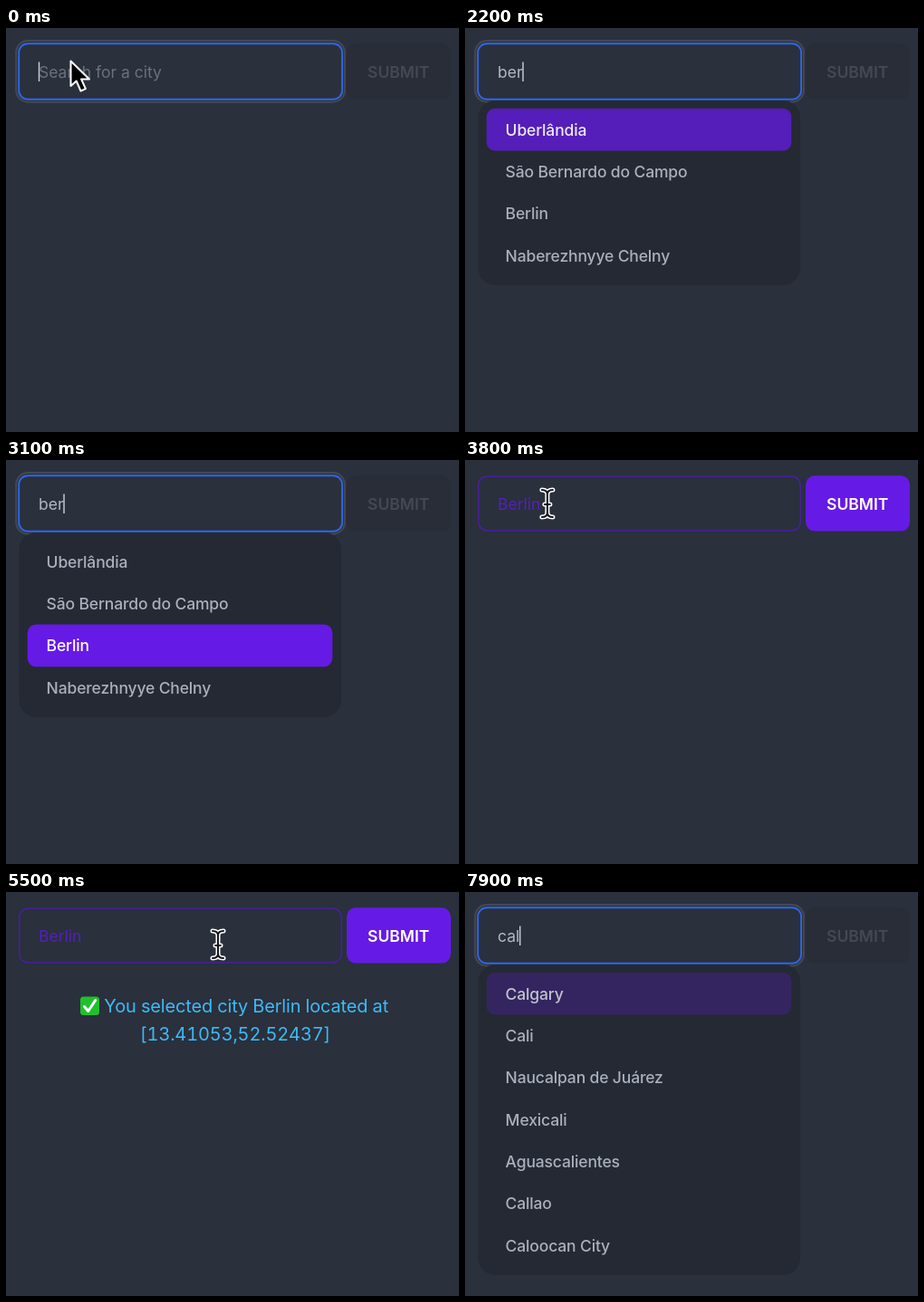
Recreate the animation shown at these times as an HTML page. Size 500 px wide and 446 px high, loop 8 s.

```html
<!DOCTYPE html>
<html lang="en">
<head>
<meta charset="utf-8">
<title>City search</title>
<style>
  html, body { margin: 0; width: 100%; height: 100%; overflow: hidden; background: #2a303c; }
  svg { display: block; width: 100%; height: 100%; }
  text { font: 400 17.5px Inter, "Open Sans", sans-serif; white-space: pre; }
  #label { font-weight: 600; text-anchor: middle; }
  #menus text { font-weight: 500; letter-spacing: -.15px; }
  #message text { font-size: 20px; letter-spacing: -.16px; font-variant-numeric: tabular-nums; fill: #3fbaf6; }
</style>
</head>
<body>
<svg viewBox="0 0 500 446">
  <rect width="500" height="446" fill="#2a303c"/>

  <g id="button">
    <rect id="face" x="376" y="17.2" width="115" height="61.4" rx="10"/>
    <text id="label" x="433.2" y="54.5">SUBMIT</text>
  </g>

  <rect id="idle" x="14.8" y="18.1" width="355.4" height="59.8" rx="9.5" fill="none" stroke="#4b1e9f" stroke-width="1.5"/>
  <g id="focus" fill="none">
    <rect x="11.2" y="14.1" width="362.7" height="67.6" rx="13" stroke="#434954" stroke-width="2"/>
    <rect x="14.2" y="17.2" width="356.9" height="61.6" rx="10" stroke="#2e66e6" stroke-width="1.9"/>
  </g>
  <text id="value" x="36" y="54.5"></text>
  <rect id="caret" y="37.5" width="1.4" height="21.5" fill="#cdd1d9"/>

  <g id="menus"></g>

  <g id="message">
    <rect x="82" y="115.5" width="21" height="20.5" rx="3.5" fill="#20c02c"/>
    <path d="M86.5 126.5l4.2 5 8-12" fill="none" stroke="#fff" stroke-width="3" stroke-linecap="round" stroke-linejoin="round"/>
    <text x="108.3" y="133">You selected city Berlin located at</text>
    <text x="253" y="164" text-anchor="middle">[13.41053,52.52437]</text>
  </g>

  <!-- pointers, hot spot at the origin -->
  <g id="arrow" stroke-linejoin="round">
    <path d="M0 0V27.5L6.2 22 11 33 16.4 30.7 11.6 20H20.5Z" fill="#000" stroke="#fff" stroke-width="2"/>
  </g>
  <defs>
    <path id="beamLine" d="M-6-15Q0-15 0-10V10Q0 15-6 15M6-15Q0-15 0-10M0 10Q0 15 6 15M-3 1H3"/>
  </defs>
  <g id="beam" fill="none" stroke-linecap="round">
    <use href="#beamLine" stroke="#fff" stroke-width="5"/>
    <use href="#beamLine" stroke="#14161b" stroke-width="2"/>
  </g>
  <g id="hand" stroke="#000" stroke-width="1.7" stroke-linejoin="round" stroke-linecap="round">
    <path d="M-3.5 2C-4-3 1.5-3 2 1L3.2 9C4 6.5 8 6.5 8.5 9.5 10 7.5 13 8 13.5 11 15.5 9.5 17.5 11 17.3 14 17.2 19 15 21 14.3 27H-.5C-1.5 22-6 19-8.5 14.5-9.8 11-5.5 10.5-2 15Z" fill="#fff"/>
    <path d="M3.2 16v6.5M7 16v6.5M10.8 16v6.5" fill="none"/>
  </g>
</svg>

<script>
const LOOP = 8000, STEP = 100, ROW = 46.3;
const NS = "http://www.w3.org/2000/svg";
const el = id => document.getElementById(id);
const clamp = p => Math.min(1, Math.max(0, p));
const fade = (t, start, span = 200) => 1 - (1 - clamp((t - start) / span)) ** 2;
const smooth = p => p * p * (3 - 2 * p);
const within = (t, from, to) => t >= from && t < to;
const show = (node, level) => node.setAttribute("opacity", +level);
const mix = (a, b, p) => `rgb(${a.map((v, i) => Math.round(v + (b[i] - v) * p))})`;

const PURPLE = [102, 26, 230], DEEP = [82, 20, 184], OFF = [41, 45, 56];
const DIM = [67, 73, 84], WHITE = [255, 255, 255], GREY = [170, 176, 189];

function add(parent, tag, attrs, text = "") {
  const node = document.createElementNS(NS, tag);
  for (const key in attrs) node.setAttribute(key, attrs[key]);
  node.textContent = text;
  parent.append(node);
  return node;
}

// `picks` holds the time at which each row in turn becomes active.
function makeMenu(from, to, names, picks) {
  const group = add(el("menus"), "g", {});
  add(group, "rect", { x: 14.5, y: 80, width: 355.5, height: 65 + ROW * (names.length - 1), rx: 19, fill: "#242933" });
  const rows = names.map((name, i) => {
    const y = 88.8 + i * ROW;
    return {
      bar: add(group, "rect", { x: 23.7, y, width: 336.6, height: 46.8, rx: 9.5, fill: `rgb(${PURPLE})` }),
      text: add(group, "text", { x: 44.6, y: y + 29.9 }, name)
    };
  });
  return t => {
    show(group, t < from ? 0 : 1 - clamp((t - to) / 100));
    rows.forEach((row, i) => {
      const level = fade(t, picks[i] ?? LOOP) - fade(t, picks[i + 1] ?? LOOP);
      show(row.bar, level);
      row.text.setAttribute("fill", mix(GREY, WHITE, level));
    });
  };
}

const menus = [
  makeMenu(1500, 3250,
    ["Uberlândia", "São Bernardo do Campo", "Berlin", "Naberezhnyye Chelny"],
    [2100, 2575, 2875]),
  makeMenu(7500, LOOP,
    ["Calgary", "Cali", "Naucalpan de Juárez", "Mexicali", "Aguascalientes", "Callao", "Caloocan City"],
    [7873])
];

const HINT = "Search for a city";
const typing = [
  [0, ""], [700, "b"], [800, "be"], [900, "ber"], [3300, "Berlin"],
  [5700, ""], [6400, "c"], [6500, "ca"], [6700, "cal"]
];
// times at which the caret turns on and off
const blinks = [[0, 400], [700, 1300], [1900, 2400], [2900, 3300], [5700, 6200], [6400, 7200], [7700, LOOP]];

function drawField(t, chosen) {
  const value = typing.findLast(([at]) => t >= at)[1];
  const text = el("value");
  text.textContent = value || HINT;
  text.setAttribute("fill", !value ? "#6b717d" : value === "Berlin" ? "#551fbd" : "#b2b8c4");
  const width = value ? text.getComputedTextLength() : 0;
  el("caret").setAttribute("x", 35.8 + width);
  show(el("caret"), blinks.some(([on, off]) => within(t, on, off)));
  show(el("idle"), chosen);
  show(el("focus"), 1 - chosen);
}

function drawButton(t, chosen, hover) {
  const pressed = within(t, 4600, 4700);
  el("face").setAttribute("fill", mix(OFF, hover ? DEEP : PURPLE, chosen));
  el("label").setAttribute("fill", mix(DIM, WHITE, chosen));
  el("button").setAttribute("transform", pressed
    ? "translate(433.5 48) scale(.95) translate(-433.5 -48)" : "");
}

function pointerAt(t) {
  if (t < 700) return { x: 71.5, y: 36.5, kind: "arrow" };
  if (!within(t, 3800, 6400)) return { x: 0, y: 0, kind: "" };
  const out = smooth(clamp((t - 3700) / 700));
  const back = smooth(clamp((t - 4800) / 700));
  const x = 71 + 359 * out - 196 * back;
  const y = 48 + 10 * back;
  return { x, y, kind: x > 376 ? "hand" : x > 371 ? "arrow" : "beam" };
}

function draw(time) {
  const t = Math.floor(time % LOOP / STEP) * STEP;
  const chosen = fade(t, 3275, 300) * (1 - fade(t, 5650, 300));
  const pointer = pointerAt(t);
  drawField(t, chosen);
  drawButton(t, chosen, pointer.kind === "hand");
  menus.forEach(menu => menu(t));
  show(el("message"), within(t, 4800, 5700));
  for (const kind of ["arrow", "beam", "hand"]) {
    show(el(kind), kind === pointer.kind);
    el(kind).setAttribute("transform", `translate(${pointer.x} ${pointer.y})`);
  }
}

let begin;
function tick(now) {
  begin ??= now;
  draw(now - begin);
  requestAnimationFrame(tick);
}
draw(0);
requestAnimationFrame(tick);
</script>
</body>
</html>
```
